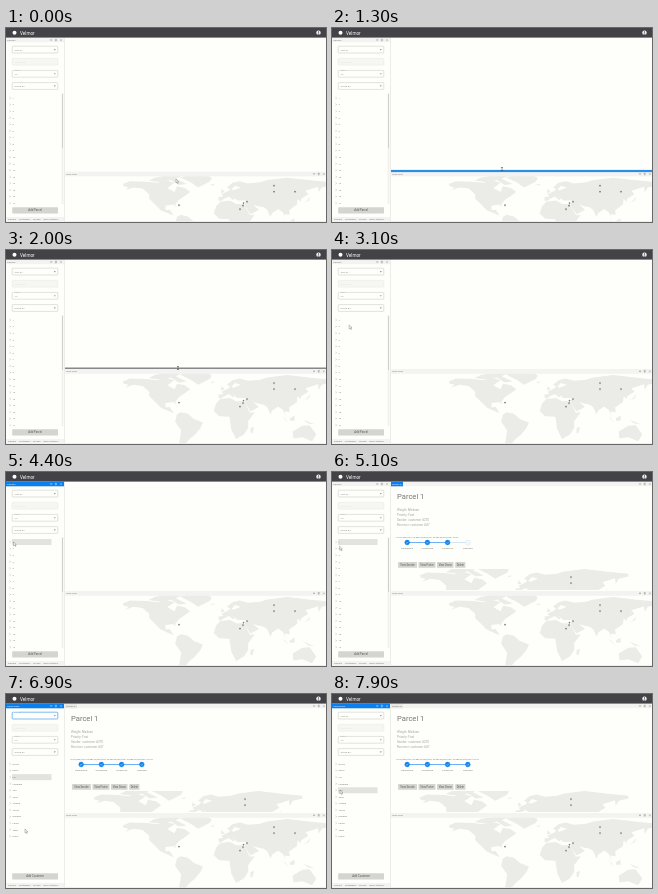
Recreate the animation shown at these times as an HTML page. Size 320x194 px, loop 8 s.

```html
<!DOCTYPE html>
<html lang="en">
<head>
<meta charset="utf-8">
<title>Parcel desk</title>
<style>
html, body { margin: 0; width: 100%; height: 100%; overflow: hidden; background: #fefefa; }
svg { display: block; width: 100vw; height: 100vh; }
text { font-family: Roboto, "Open Sans", sans-serif; }
</style>
</head>
<body>
<svg viewBox="0 0 320 194">
  <defs>
    <!-- continents in degrees of longitude and latitude -->
    <g id="land" transform="scale(.603 -.57)" fill="#ebebe7">
      <path d="M-168 66L-156 71-128 70-110 68-95 72-82 68-94 59-82 52-78 62-65 59-56 52-65 45-75 38-81 30-80 25-84 30-97 28-97 20-90 21-87 16-83 10-78 8-92 14-105 20-114 30-124 40-124 48-135 58-150 60-164 55-158 60-166 62z"/>
      <path d="M-125 72L-115 77-90 82-65 83-80 75-62 66-75 64-88 73-105 69zM-73 78L-55 82-30 83-20 76-24 70-43 60-54 68zM-24 65L-15 66-18 63z"/>
      <path d="M-78 8L-72 12-60 9-50 0-35-6-39-16-48-27-58-36-65-45-68-55-75-48-71-20-81-5z"/>
      <path d="M-6 35L10 37 20 31 33 31 43 11 51 12 40-4 40-16 33-27 20-35 12-18 9 4-8 5-17 14-13 27zM44-16L50-14 47-25 44-24z"/>
      <path d="M-9 37L-9 43-1 44-4 48 8 54 10 57 16 55 28 60 18 63 12 56 5 60 14 68 26 71 40 67 60 69 72 73 105 77 140 73 178 69 178 64 162 60 157 51 156 61 135 54 140 48 128 40 127 35 122 40 121 30 108 20 109 12 100 13 103 1 98 16 90 22 80 15 77 8 72 20 66 25 56 27 48 30 58 21 44 13 34 29 36 37 27 37 22 37 13 46 18 40 15 38 8 44 0 40-5 36z"/>
      <path d="M-5 50L1 52-4 58zM131 32L141 37 143 44 138 37zM114-22L130-12 142-11 153-27 146-39 130-32 115-34zM96 5L106-6 103-1zM109 1L117 6 117-3 110-3zM131-1L150-9 140-8z"/>
    </g>
    <clipPath id="detail"><rect x="59" y="97" width="261" height="21"/></clipPath>
  </defs>
  <g id="scene"></g>
</svg>
<script>
const BLUE = '#0a7ff0', PAPER = '#fefefa', BAR = '#f3f3f1', GREY = '#d4d4d1', INK = '#777';
const scene = document.getElementById('scene');

const rect = (x, y, w, h, fill, more = '') =>
  `<rect x="${x}" y="${y}" width="${w}" height="${h}" fill="${fill}" ${more}/>`;
const text = (x, y, s, size = 3, fill = INK, more = '') =>
  `<text x="${x}" y="${y}" font-size="${size}" fill="${fill}" ${more}>${s}</text>`;
const circle = (x, y, r, fill, more = '') =>
  `<circle cx="${x}" cy="${y}" r="${r}" fill="${fill}" ${more}/>`;
const line = (d, stroke = INK, width = .5, more = '') =>
  `<path d="${d}" fill="none" stroke="${stroke}" stroke-width="${width}" ${more}/>`;
const button = (x, y, w, h, s, size) =>
  rect(x, y, w, h, GREY, 'rx=".6"') +
  text(x + w / 2, y + h / 2 + size * .36, s, size, '#555', 'text-anchor="middle"');

// time, x, y
const route = [
  [0, 170, 151], [600, 170, 149], [950, 170, 143], [1300, 170, 141], [1500, 170, 141],
  [1950, 172, 118], [2200, 172, 118], [2900, 19, 76], [3700, 7.5, 70], [5000, 7.5, 70],
  [5850, 11, 180], [6250, 18, 191], [6600, 18, 191], [6900, 19, 135], [7400, 8.5, 96], [8000, 8, 96]
];
function pointer(t) {
  const i = route.findIndex(p => p[0] > t), [t0, x0, y0] = route[i - 1], [t1, x1, y1] = route[i];
  const u = (t - t0) / (t1 - t0), k = u * u * (3 - 2 * u);
  return [x0 + (x1 - x0) * k, y0 + (y1 - y0) * k];
}

const paneIcons = (x, y, ink) =>
  line(`M${x - 1} ${y - .4}h2l-1 1z`, ink, .35) +
  line(`M${x + 4} ${y - 1}h1.4v1.3h-1.4zm.7 1.3v1.2`, ink, .35) +
  line(`M${x + 9} ${y - .8}l1.6 1.6m0-1.6l-1.6 1.6`, ink, .35);

function field(y, label, { raised = '', focus = false, off = false } = {}) {
  const edge = focus ? '#4aa0f0' : off ? '#e4e4e0' : '#bbb';
  let s = rect(6.2, y, 45.6, 6.8, off ? '#f6f6f2' : 'none', `rx=".8" stroke="${edge}" stroke-width="${focus ? .7 : .45}"`);
  if (raised) s += rect(7.5, y - .6, 6, 1.2, PAPER) + text(8, y + .7, raised, 2, focus ? BLUE : '#888');
  s += text(8.5, y + 4.3, label, 2.5, off ? '#ddd' : '#888');
  return off ? s : s + `<path d="M47.8 ${y + 3}h2l-1 1.2z" fill="#777"/>`;
}

const numbers = Array.from({ length: 17 }, (_, i) => i + 1);
const people = ['Dovra', 'Niron', 'Lio', 'Maratela', 'Jun', 'Torvi', 'Andola', 'Joma', 'Runavel', 'Mirgo', 'Jeda', 'Huno'];

function sidebar(t) {
  const customers = t >= 6300, active = t >= 4000 && t < 5000 || customers;
  const focus = customers && t < 7600;
  const marked = customers ? (focus ? 2 : 4) : t >= 3900 ? 0 : -1;
  const ink = active ? '#fff' : INK;
  let s = rect(0, 9.5, 58, 184.5, PAPER) + rect(0, 9.7, 58, 4.6, active ? BLUE : BAR) +
    text(1.2, 13, customers ? 'Customers' : 'Parcels', 2.5, ink) + paneIcons(45.2, 12.1, ink);
  s += focus ? field(18.2, '', { raised: 'Sort by', focus }) : field(18.2, 'Sort by');
  s += field(30.4, 'Sort order', { off: true }) + field(42.4, 'All', { raised: 'Status' }) + field(54.6, 'Group By');
  (customers ? people : numbers).forEach((name, i) => {
    const y = 70 + i * 6.57;
    if (i === marked) s += rect(6, y - 3, 39.5, 6, '#e2e2de');
    s += line(`M3.6 ${y - .8}l.9.8-.9.8`, '#888', .4) + text(6.4, y + .9, name, 2.5);
  });
  if (!customers) s += rect(55.7, 65, 1.7, 111, '#f0f0ec') + rect(56.1, 66, .9, 54, '#ccc');
  s += button(6.2, 179.2, 45.8, 6.4, customers ? 'Add Customer' : 'Add Parcel', 2.8);
  s += rect(0, 189, 58, 5, BAR);
  [[2, 'Parcels'], [12.8, 'Customers'], [27, 'Drones'], [37.5, 'Base Stations']].forEach(([x, name], i) =>
    s += text(x, 192.4, name, 2.4, i === +customers ? BLUE : INK));
  return s + rect(58, 9.5, .8, 184.5, '#e8e8e5');
}

const pins = [[173, 152.5], [268, 133], [268, 139], [289, 139], [241, 149], [237.5, 150.5], [237, 153], [234, 156.5]];
const pin = ([x, y]) => circle(x, y, .8, '#777') + rect(x - .3, y - .2, .6, 1.4, '#888');

function mapPane(top) {
  return rect(59, top, 261, 194 - top, PAPER) +
    `<use href="#land" transform="translate(218 ${top + 50})"/>` +
    `<g transform="translate(0 ${top - 119})">${pins.map(pin).join('')}</g>` +
    rect(59, top, 261, 4.8, BAR) + text(60, top + 3.3, 'View Map', 2.5) +
    paneIcons(308, top + 2.4, INK) + rect(59, 193.2, 261, .8, '#ececea');
}

function parcel(t) {
  const active = t < 6300, done = t < 6500 ? 3 : 4;
  let s = rect(59, 9.7, 261, 4.6, BAR) + rect(59, 9.7, 12, 4.6, active ? BLUE : '#e8e8e6') +
    text(60, 13, 'Parcel #1', 2.5, active ? '#fff' : INK) + paneIcons(308, 12.1, INK) +
    `<g clip-path="url(#detail)"><use href="#land" transform="translate(189 141)"/></g>` +
    pin([239, 105]) + pin([239, 111]) + text(65, 27.2, 'Parcel 1', 7.6, INK);
  ['Weight: Medium', 'Priority: Fast', 'Sender: customer #270', 'Receiver: customer #47'].forEach((row, i) =>
    s += text(65, 38.6 + i * 5.1, row, 3.1, '#a4a4a2'));
  s += line('M75 70.5H115.5', BLUE, .6) + line('M115.5 70.5H136', done > 3 ? BLUE : '#bbd6ee', .6);
  ['Requested', 'Scheduled', 'Picked up', 'Supplied'].forEach((name, i) => {
    const x = 75.2 + i * 20.2, on = i < done;
    s += circle(x, 70.5, 2.4, on ? BLUE : PAPER, `stroke="${on ? BLUE : '#bbd6ee'}" stroke-width=".4"`) +
      line(`M${x - 1} 70.5l.8.8 1.4-1.6`, on ? '#fff' : '#bbd6ee', .5) +
      text(x, 77.3, name, 2.5, INK, 'text-anchor="middle"');
    if (on) s += text(x, 66.2, 'Fri 06/Feb/2021 09:4' + i, 2.2, INK, 'text-anchor="middle"');
  });
  [[66, 19, 'View Sender'], [86.5, 17, 'View Porter'], [105, 16.5, 'View Drone'], [123.2, 10.2, 'Delete']].forEach(([x, w, name]) =>
    s += button(x, 90, w, 5.8, name, 2.6));
  return s;
}

const header = rect(0, 0, 320, 9.6, '#434247') + circle(8.5, 4.7, 2, '#fff') +
  text(14, 6.6, 'Velmor', 4.6, '#fff') +
  circle(312.5, 4.7, 2.2, '#fff') + circle(312.5, 4, .75, '#434247') +
  '<path d="M311 6.1q1.5-1.4 3 0q-1.5 1.4-3 0" fill="#434247"/>';

function splitter(t, y) {
  if (t >= 1000 && t < 1500) return rect(59, 141.9, 261, 2.2, '#2a8ee8');
  if (t >= 1500 && t < 2150) return rect(59, Math.min(142, y - .5), 261, 1.5, '#888');
  return '';
}

function cursor(t, x, y) {
  if (t >= 950 && t < 2200)
    return line(`M${x} ${y - 2}v4m-1-3l1-1 1 1m-2 2l1 1 1-1`, '#444', .5);
  return `<path d="M${x} ${y}v3.8l.9-.8.7 1.5.7-.3-.7-1.5h1.2z" fill="#fff" stroke="#555" stroke-width=".35"/>`;
}

function draw(now) {
  const t = now % 8000, [x, y] = pointer(t);
  scene.innerHTML = rect(0, 0, 320, 194, PAPER) + mapPane(t < 1950 ? 143.6 : 119) +
    (t >= 5000 ? parcel(t) : '') + sidebar(t) + header + splitter(t, y) + cursor(t, x, y);
  requestAnimationFrame(draw);
}
requestAnimationFrame(draw);
</script>
</body>
</html>
```
